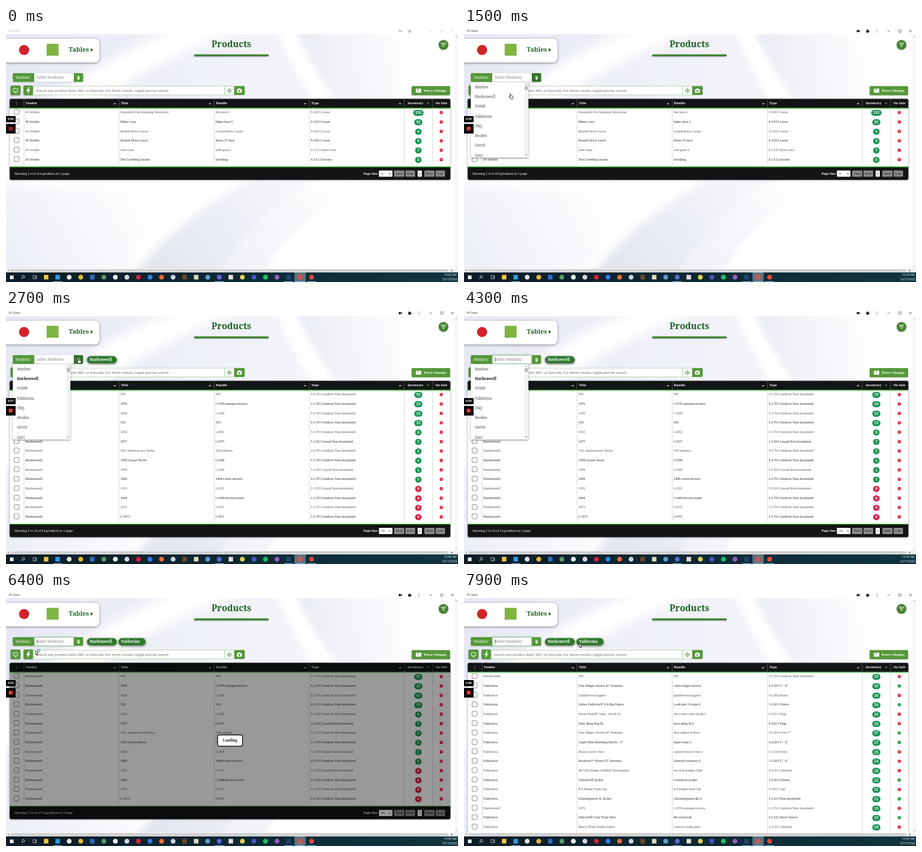
An HTML page with a canvas for the animation above (8 s loop, 800x450 px).

```html
<!DOCTYPE html>
<html lang="en">
<head>
<meta charset="utf-8">
<title>Products</title>
<style>
html, body { margin: 0; width: 100%; height: 100%; overflow: hidden; background: #fff; }
canvas { display: block; width: 100vw; height: 100vh; }
</style>
</head>
<body>
<canvas id="stage"></canvas>
<script>
const LOOP = 8000, W = 800, H = 450;
const SLAB = '"Noto Serif", serif', SANS = '"Open Sans", sans-serif';
const GREEN = '#559839', DARK = '#1d6420', PITCH = 16.67;
const canvas = document.getElementById('stage');
const dpr = window.devicePixelRatio || 1;
canvas.width = W * dpr;
canvas.height = H * dpr;
let c = canvas.getContext('2d');

const BOOT = 'Harkenwell', WEAR = 'Valdorina';
const VENDORS = ['Marlow', BOOT, 'VOMP', WEAR, 'TRQ', 'Imolea', 'Gerrit', 'Zuvi'];
const MATCHES = [WEAR, 'Valden Court', 'Norval Discovery Gear'];

// title | handle | type | inventory | on sale | own vendor
const parse = (vendor, lines) => lines.trim().split('\n').map(l => {
  const [title, handle, type, stock, sale, own] = l.trim().split('|');
  return { vendor: own || vendor, title, handle, type, stock, sale: sale === 'y' };
});
const LACES = parse('30 Strides', `
  Standard Flat Running Shoelaces|flat-lace-1|9.3.051 Laces|192
  Hiker Lace|hiker-lace-1|9.3.051 Laces|92
  Round Dress Laces|round-dress-1-pair|9.3.051 Laces|9
  Round Dress Laces|dress-27-lace|9.3.051 Laces|8
  Sole Gum|sole-gum-1|9.3.131 Shoe Care|7
  The Levelling Insole|levelling|9.3.111 Insoles|5`);
const OUT = 'Outdoor Non-Insulated', CAS = 'Casual Non-Insulated';
const BOOTS = parse(BOOT, `
  585|585|9.1.701 ${OUT}|55
  1970|l-1970-antique-brown|5.1.701 ${OUT}|19
  1630|l-1630|5.1.701 ${OUT}|15
  510|510|9.1.701 ${OUT}|13
  2052|l-2052|5.1.701 ${OUT}|8
  1977|l-1977|5.1.501 ${CAS}|7
  150, Anniversary Series|150-auburn|4.1.701 ${OUT}|2
  1306 Gusset Boots|l-1306|5.1.701 ${OUT}|1
  1309|l-1309|5.1.501 ${CAS}|1
  1496|1496-rustic-brown|4.1.701 ${OUT}|1
  1351|l-1351|5.1.501 ${CAS}|0
  1409|l-1409-brown-multi|5.1.701 ${OUT}|0
  1671|l-1671|5.1.701 ${OUT}|0
  L 1971|l-1971|5.1.701 ${OUT}|0`);
const MIXED = parse(WEAR, `
  585|585|9.1.701 ${OUT}|55||${BOOT}
  Five Ridges Shorts (6" Inseam)|l-five-ridges-shorts|5.2.203 5" - 6"|39|y
  Quillhaven Joggers|quillhaven-joggers|4.2.302 Pants|39
  Softer Pullover® 1/4-Zip Fleece|l-soft-plv-1-4-zip-4|5.2.451 Fleece|34|y
  Stone Vault® Cube - Small 3L|stn-vault-cube-small-1|9.3.011 Bags|33
  Fern Sling Bag 8L|fern-sling-8l-1|9.3.011 Bags|29
  Five Ridges Shorts (8" Inseam)|five-ridges-8-short|4.2.205 Over 7"|27|y
  Loper Max Running Shorts - 5"|loper-max-5|4.2.203 5" - 6"|27|y
  Plume Layer Vest|l-plume-layer-vest-1|5.2.524 Vests|25
  Roomers™ Shorts (5" Inseam)|l-barely-roomers-5|5.2.203 5" - 6"|24
  Mt Orla Badge Softknit Sweatpants|mt-orla-badge-softk|4.2.321 Lifestyle|24
  Tumbrel® Jacket|l-tumbrel-jacket|5.2.501 Fitness|22|y
  K-4 Badge Trad Cap|k-4-badge-trad-cap|9.3.031 Cap|22
  Drizzleguard 3L Jacket|l-drizzleguard-jkt-3|5.2.523 Non-Insulated|21|y
  1970|l-1970-antique-brown|5.1.701 ${OUT}|19||${BOOT}
  Fibravel® Cool Trail Shirt|fib-cool-trail|4.2.102 Short Sleeve|19|y
  Merry Walk Studio Pants|l-merry-walk-pant|5.2.321 Lifestyle|18
  Quillhaven Vest|quillhaven-vest|5.2.524 Vests|18`);

function text(s, x, y, size, color, opt = {}) {
  c.font = `${opt.weight || 400} ${size}px ${opt.font || SLAB}`;
  c.textAlign = opt.align || 'left';
  c.textBaseline = 'middle';
  c.fillStyle = color;
  c.fillText(s, x, y);
}
const bold = (s, x, y, size, color, align) => text(s, x, y, size, color, { weight: 700, align });

function paint(fill, stroke, lw) {
  if (fill) { c.fillStyle = fill; c.fill(); }
  if (stroke) { c.strokeStyle = stroke; c.lineWidth = lw; c.stroke(); }
}
function rect(x, y, w, h, fill, r = 0, stroke, lw = 0.8) {
  c.beginPath();
  c.roundRect(x, y, w, h, r);
  paint(fill, stroke, lw);
}
function disc(x, y, r, fill, stroke, lw = 0.8) {
  c.beginPath();
  c.arc(x, y, r, 0, Math.PI * 2);
  paint(fill, stroke, lw);
}
function poly(pts, fill, stroke, lw = 0.8, close = true) {
  c.beginPath();
  pts.forEach(([x, y], i) => i ? c.lineTo(x, y) : c.moveTo(x, y));
  if (close) c.closePath();
  paint(fill, stroke, lw);
}
const line = (x1, y1, x2, y2, color, lw) => poly([[x1, y1], [x2, y2]], null, color, lw, false);
// small triangle: d = 1 points down, -1 up
const tri = (x, y, s, d, color) => poly([[x - s, y - d * s / 2], [x + s, y - d * s / 2], [x, y + d * s / 2]], color);
function shadowed(blur, dy, color, draw) {
  c.save();
  c.shadowBlur = blur * dpr;
  c.shadowOffsetY = dy * dpr;
  c.shadowColor = color;
  draw();
  c.restore();
}
function blend(x1, y1, x2, y2, from, to) {
  const g = c.createLinearGradient(x1, y1, x2, y2);
  g.addColorStop(0, from);
  g.addColorStop(1, to);
  return g;
}

const backdrop = document.createElement('canvas');
function paintBackdrop() {
  backdrop.width = canvas.width;
  backdrop.height = canvas.height;
  const main = c;
  c = backdrop.getContext('2d');
  c.scale(dpr, dpr);
  c.fillStyle = '#fff';
  c.fillRect(0, 0, W, H);
  const clear = 'rgba(238,240,249,0)';
  const swoosh = (blur, fill, path) => {
    c.filter = `blur(${blur * dpr}px)`;
    c.fillStyle = fill;
    c.fill(new Path2D(path));
  };
  // upper sheet, bright beam and the haze to its right
  swoosh(5, blend(0, 70, 520, 50, '#e6e8f4', '#f4f5fa'), 'M-30 -20 L470 -20 Q500 60 550 140 L-30 190Z');
  swoosh(10, '#fff', 'M150 140 Q260 60 440 -10 L340 -10 Q200 30 60 140Z');
  swoosh(5, blend(540, 60, 730, 40, '#eceef5', clear), 'M500 -20 Q540 70 600 150 L760 150 L760 -20Z');
  // lower folds
  swoosh(10, blend(0, 430, 260, 280, '#eceef7', clear), 'M-30 270 Q140 300 300 260 L200 470 L-30 470Z');
  swoosh(8, blend(260, 440, 500, 260, '#e2e5f0', '#f6f7fb'), 'M205 470 Q290 330 500 235 L600 245 Q440 320 370 470Z');
  swoosh(3, blend(380, 430, 600, 260, '#f1f2f8', clear), 'M370 450 Q430 330 620 250 L700 250 Q500 330 450 450Z');
  c = main;
}

function titleBar(active) {
  const ink = active ? '#222' : '#c4c4c4';
  rect(0, 0, W, 11, '#fff');
  text('RT Desk', 5, 5.8, 5.2, active ? '#333' : '#bbb', { font: SANS });
  rect(695, 3.5, 4, 4, ink, 1);
  poly([[698.5, 5.5], [701, 3.8], [701, 7.2]], ink);
  rect(712, 3.8, 4.5, 4.5, ink, 0.6);
  disc(714.2, 3.6, 1.1, ink);
  disc(716.8, 6, 1.1, ink);
  for (let i = 0; i < 3; i++) disc(731, 3.4 + i * 2.1, 0.6, ink);
  line(749.5, 5.5, 754, 5.5, ink, 0.6);
  rect(769.3, 3.4, 4, 4, null, 0, ink, 0.6);
  line(788, 3.2, 792.3, 7.5, ink, 0.7);
  line(792.3, 3.2, 788, 7.5, ink, 0.7);
}

function pageHead() {
  shadowed(4, 1, 'rgba(0,0,0,.45)', () => rect(-12, 19, 177.5, 42, '#fff', 8));
  disc(32, 39, 9, '#d2232a');
  rect(72, 28, 21, 21, '#7fb441');
  bold('Tables', 111, 38.5, 10.9, DARK);
  poly([[150, 35.5], [154, 38.7], [150, 42]], DARK);
  bold('Products', 399, 29.7, 15.6, DARK, 'center');
  shadowed(2, 1, 'rgba(0,0,0,.4)', () => rect(333, 46.8, 132, 3.2, '#3f8231', 1.6));
  shadowed(2, 0.5, 'rgba(0,0,0,.35)', () => disc(774.3, 29.8, 8.6, '#43842f'));
  [4.6, 3, 1.3].forEach((w, i) => line(774.3 - w, 27 + i * 2.8, 774.3 + w, 27 + i * 2.8, '#fff', 1.2));
}

function toolbar() {
  const edge = '#a3cf92', ink = '#4a8c35';
  shadowed(2, 0.5, 'rgba(0,0,0,.4)', () => {
    rect(8, 102, 17.5, 17, GREEN, 2);
    rect(31, 102, 17, 17, GREEN, 2);
    rect(718, 103, 68, 16, GREEN, 2);
  });
  rect(13, 107.3, 7.5, 5.6, null, 0.8, '#fff', 1);
  line(15, 115, 18.8, 115, '#fff', 1);
  poly([[40.5, 104.5], [35.8, 111.4], [39, 111.4], [37.6, 117], [43.2, 109.2], [39.9, 109.2], [42, 104.5]], '#fff');
  rect(48, 103, 339, 15.6, '#fff', 0, edge);
  text('Search any product field, SKU, or barcode. For fewer results, toggle precise search', 53, 111, 6.05, '#666');
  rect(387, 103, 17, 15.6, '#fff', 0, edge);
  disc(395.4, 110.9, 2.9, null, ink, 0.9);
  disc(395.4, 110.9, 1.1, ink);
  for (const d of [-1, 1]) {
    line(395.4 + d * 3, 110.9, 395.4 + d * 4.6, 110.9, ink, 0.9);
    line(395.4, 110.9 + d * 3, 395.4, 110.9 + d * 4.6, ink, 0.9);
  }
  rect(404, 102.8, 18.5, 16, GREEN, [0, 2, 2, 0]);
  rect(408.8, 108.3, 8.6, 6.2, '#fff', 1);
  rect(411.3, 107, 3.6, 2, '#fff', 0.6);
  disc(413.1, 111.4, 1.7, GREEN);
  rect(725.5, 107.5, 9.5, 7, '#fff', 0.8);
  bold('$', 729.5, 111, 5, GREEN, 'center');
  bold('Price Change', 739.5, 111, 6.1, '#fff');
}

function vendorBar(s) {
  shadowed(2, 0.5, 'rgba(0,0,0,.25)', () => rect(12, 80, 124.5, 15.6, '#fff', 2));
  rect(12, 80, 38, 15.6, GREEN, [2, 0, 0, 2]);
  text('Vendors:', 17, 88, 6.4, '#fff');
  if (s.focus) shadowed(2.5, 0, 'rgba(60,170,80,.5)', () => rect(50, 80.3, 70, 15, '#fff', 0, '#8cc98e', 0.7));
  text(s.typed || 'Select Vendor(s)', 54.8, 88, 6.2, s.typed ? '#333' : '#777');
  if (s.focus) {
    const x = 55 + (s.typed ? c.measureText(s.typed).width : 0);
    line(x, 84.3, x, 91.6, '#222', 0.6);
  }
  rect(120, 80, 16.5, 15.6, s.hover ? '#33702a' : GREEN, [0, 2, 2, 0]);
  line(125.8, 85.6, 131, 85.6, '#fff', 0.8);
  poly([[126.4, 86.8], [130.4, 86.8], [129.8, 91.4], [127, 91.4]], '#fff');
  s.chips.forEach(([name, x, w]) => {
    shadowed(4, 1, 'rgba(0,0,0,.65)', () => rect(x, 81.8, w, 12.8, '#2f7a2d', 6.4));
    bold(name, x + 4.8, 88.1, 6.6, '#fff');
    text('×', x + w - 6, 88.8, 5, '#174d17');
  });
}

function badge(n, x, y) {
  const w = [11.5, 14.5, 18.5][n.length - 1];
  rect(x - w / 2, y - 5.4, w, 10.8, n === '0' ? '#d2234b' : '#1b9458', 5.4);
  bold(n, x, y + 0.1, 6.7, '#fff', 'center');
}

function saleMark(on, x, y) {
  disc(x, y, 2.9, on ? '#129a3c' : '#dd1830');
  if (on) return poly([[x - 1.3, y], [x - 0.3, y + 1.1], [x + 1.4, y - 1]], null, '#fff', 0.7, false);
  line(x - 1, y - 1, x + 1, y + 1, '#fff', 0.7);
  line(x + 1, y - 1, x - 1, y + 1, '#fff', 0.7);
}

function table(rows, loading) {
  const foot = 146 + rows.length * PITCH, end = foot + 23;
  shadowed(3, 0.5, 'rgba(0,0,0,.5)', () => rect(6.5, 125.5, 780, end - 125.5, '#fff', 3));
  rect(6.5, 125.5, 780, 16.5, '#131415', [3, 3, 0, 0]);
  [32, 200, 368.5, 537, 705, 755].forEach(x => {
    line(x, 126, x, 141, '#777', 0.6);
    line(x, 143, x, foot - 4, '#c6c6c6', 0.7);
  });
  for (let i = 0; i < 3; i++) disc(18.8, 131.5 + i * 2.1, 0.5, '#fff');
  const heads = { Vendor: 35, Title: 203.5, Handle: 371.5, Type: 540.5, Inventory: 711, 'On Sale': 760 };
  for (const h in heads) bold(h, heads[h], 133.8, 5.5, '#fff');
  [192.5, 361, 529.5, 697.5].forEach(x => tri(x, 133.8, 2.6, -1, '#bbb'));
  tri(747, 133.8, 2.6, 1, '#56a04a');
  line(6.5, 142, 786.5, 142, '#36b436', 1.3);

  rows.forEach((r, i) => {
    const y = 149.7 + i * PITCH, ink = i % 2 ? '#2a2a2a' : '#555';
    rect(14.4, y - 5.2, 8.8, 8.8, '#fff', 1.6, '#666', 0.8);
    text(r.vendor, 34, y, 5.45, ink);
    text(r.title, 202.5, y, 5.45, ink);
    text(r.handle, 371, y, 5.45, ink);
    text(r.type, 539.5, y, 5.45, ink);
    badge(r.stock, 729.8, y + 0.6);
    saleMark(r.sale, 770.4, y + 0.1);
  });

  rect(6.5, foot, 780, 23, '#131415', [0, 0, 3, 3]);
  line(6.5, foot, 786.5, foot, '#36b436', 1.3);
  const y = foot + 12, n = rows.length;
  text(`Showing 1 to ${n} of ${n} products in 1 page`, 15, y, 5.4, '#fff', { weight: 500 });
  bold('Page Size', 658, y, 5.4, '#fff', 'right');
  rect(660, y - 5.5, 24, 11, '#fff', 1);
  text(n, 664, y, 5.4, '#333');
  poly([[677.4, y - 0.8], [679.2, y + 1], [681, y - 0.8]], null, '#222', 0.9, false);
  const button = (label, x, w, fill = '#8a8a8a') => {
    rect(x, y - 5.5, w, 11, fill, 1);
    text(label, x + w / 2, y, 5.6, '#222', { align: 'center', weight: 500 });
  };
  button('First', 687, 18);
  button('Prev', 707, 17);
  button('1', 728.5, 7.5, '#fff');
  button('Next', 740.5, 18);
  button('Last', 760.5, 16.5);

  if (loading) {
    const mid = (125 + end) / 2;
    rect(6.5, 125.5, 780, end - 125.5, 'rgba(0,0,0,.4)', 3);
    rect(374.5, mid - 10.5, 44, 20, '#fff', 3, '#111', 1.4);
    bold('Loading', 396.5, mid - 0.4, 6.2, '#222', 'center');
  }
}

function dropdown(items, picked) {
  const full = items.length > 3, w = full ? 102 : 88, h = full ? 133.5 : 52.5;
  shadowed(3, 1, 'rgba(0,0,0,.4)', () => rect(12, 96, w, h, '#fff'));
  c.save();
  c.beginPath();
  c.rect(12, 96, w, h);
  c.clip();
  items.forEach((v, i) => text(v, 19.5, 104.8 + i * 17.3, 6.4, v === picked ? '#111' : '#444', { weight: v === picked ? 700 : 400 }));
  if (full) {
    rect(107, 96, 7, h, '#f3f3f3');
    rect(107.6, 103, 5.6, 7, '#bdbdbd');
    tri(110.4, 99.5, 1.7, -1, '#999');
    tri(110.4, 225, 1.7, 1, '#444');
  }
  c.restore();
}

function scrollbars() {
  rect(794, 11, 6, 416, '#f7f7f7');
  tri(797, 15, 1.6, -1, '#888');
  tri(797, 423, 1.6, 1, '#888');
  rect(0, 426.5, W, 6.5, '#f1f1f1');
  rect(8, 427.5, 774, 4.6, '#cfcfcf');
  poly([[5, 428], [5, 431.6], [2.6, 429.8]], '#777');
  poly([[788, 428], [788, 431.6], [790.4, 429.8]], '#444');
}

const ICONS = '#f4c542 #2f9be0 #e8e8e8 #e2b93b #2d6fc4 #5a9a6a #e9f2ec #ded5e2 #d8213b #2d7ff0 #f26b3a #c9d5e0 #6b4a2a #d9dfb5 #5d9fd0 #5b69dd #e8dcdc #e5cf55 #4757c8 #1fc25c #9c58c0 #24456e #d9534f #e2483b'.split(' ');
function taskbar() {
  rect(0, 433, W, 17, blend(0, 0, W, 0, '#0d1c28', '#0f3540'));
  rect(7, 438.5, 6.4, 6.4, '#fff');
  disc(30.8, 440.7, 2.2, null, '#fff', 0.8);
  line(29.2, 442.5, 27.2, 444.7, '#fff', 0.9);
  rect(48, 438.8, 4.4, 5.6, null, 0, '#ddd', 0.8);
  line(54, 438.5, 54, 444.8, '#ddd', 0.8);
  rect(510.5, 433, 20, 17, '#5a7480');
  ICONS.forEach((color, i) => {
    const x = 71 + i * 20.43;
    if ([0, 1, 4, 12, 13, 16, 21, 22].includes(i)) rect(x - 4, 437.5, 8, 8, color);
    else disc(x, 441.5, 4.3, color);
    if ([1, 15, 21, 22, 23].includes(i)) rect(x - 8, 448.8, 16, 1.2, '#76b9ed');
  });
  text('10:50 AM', 797.5, 437.6, 5.1, '#fff', { font: SANS, align: 'right' });
  text('12/17/2022', 798.5, 445.2, 5.1, '#fff', { font: SANS, align: 'right' });
}

function recorder(t) {
  const left = 300 - Math.floor(t * 1.4 / 1000);
  const clock = `${Math.floor(left / 60)}:${String(left % 60).padStart(2, '0')}`;
  rect(0, 156, 17, 11, '#050505');
  text(clock, 8.3, 161.7, 5.2, '#fff', { weight: 700, align: 'center', font: SANS });
  rect(0, 170, 17, 17, '#0a0a0a');
  if (t < 700) for (let i = 0; i < 3; i++) rect(5 + i * 2.4, 175, 1.7, 6.6, '#e0202c');
  else rect(4.9, 175, 6.6, 6.6, '#f0392e', 0.6);
}

// pointer path: [time, x, y]
const PATH = [
  [800, 175, 140], [1200, 128, 86], [1500, 81.5, 116], [1900, 62, 121], [2250, 64, 121],
  [2600, 127.5, 85], [3100, 128, 85], [3650, 86, 87], [4150, 86, 87],
  [5450, 92, 128], [5950, 69, 102], [6250, 52, 104], [6400, 52, 104],
  [7150, 219.5, 51], [7400, 219.5, 51], [7850, 204, 91], [8000, 204, 91]
];
function pointerAt(t) {
  if (t < PATH[0][0] || (t > 4150 && t < 5450)) return null;
  let i = 0;
  while (i < PATH.length - 2 && PATH[i + 1][0] <= t) i++;
  const [t0, x0, y0] = PATH[i], [t1, x1, y1] = PATH[i + 1];
  let k = (t - t0) / (t1 - t0);
  k = k * k * (3 - 2 * k);
  return [x0 + (x1 - x0) * k, y0 + (y1 - y0) * k];
}

const HAND = new Path2D('M0 .8 Q.8 0 1.5 .8 L1.5 4 L5 4.8 Q5.7 5 5.5 6 L4.9 9.6 L.9 9.6 L-1.8 6.5 Q-2 5.4 -.9 5.8 L0 6.5Z');
const ARROW = new Path2D('M0 0 L0 7 L1.6 5.6 L2.7 8 L3.7 7.5 L2.7 5.2 L4.9 5.1Z');
function pointer(t, s) {
  const p = pointerAt(t);
  if (!p) return;
  const [x, y] = p;
  const field = x > 50 && x < 120 && y > 80 && y < 96;
  if (field && t > 3300) {
    line(x, y - 3.5, x, y + 3.5, '#222', 0.7);
    return;
  }
  const hand = s.hover || field || (s.list && x > 12 && x < 114 && y > 96);
  c.save();
  c.translate(x, y);
  const shape = hand ? HAND : ARROW;
  c.fillStyle = '#fff';
  c.fill(shape);
  c.strokeStyle = '#111';
  c.lineWidth = 0.8;
  c.stroke(shape);
  if (s.loading && !hand) disc(5.7, 0.2, 2.2, null, '#3a9be0', 1.3);
  c.restore();
}

function stateAt(t) {
  const keys = Math.max(0, Math.min(4, Math.floor((t - 4500) / 220)));
  const typed = t < 6350 ? 'vald'.slice(0, keys) : '';
  const chips = [];
  if (t >= 1900) chips.push([BOOT, 143.5, 52.5]);
  if (t >= 6350) chips.push([WEAR, 199, 48]);
  return {
    typed, chips,
    focus: t >= 3800,
    hover: (t >= 1080 && t < 1580) || (t >= 2530 && t < 3250),
    loading: (t >= 1900 && t < 2300) || (t >= 6350 && t < 7500),
    list: t < 1250 || t >= 6350 ? null : typed.length > 1 ? MATCHES : VENDORS,
    picked: t >= 1900 ? BOOT : '',
    rows: t < 2300 ? LACES : t < 7500 ? BOOTS : MIXED
  };
}

function draw(t) {
  const s = stateAt(t);
  c.setTransform(1, 0, 0, 1, 0, 0);
  c.drawImage(backdrop, 0, 0);
  c.setTransform(dpr, 0, 0, dpr, 0, 0);
  pageHead();
  toolbar();
  vendorBar(s);
  table(s.rows, s.loading);
  if (s.list) dropdown(s.list, s.picked);
  titleBar(t >= 1050);
  scrollbars();
  taskbar();
  recorder(t);
  pointer(t, s);
}

paintBackdrop();
const start = performance.now();
function tick() {
  draw((performance.now() - start) % LOOP);
  requestAnimationFrame(tick);
}
tick();
</script>
</body>
</html>
```
